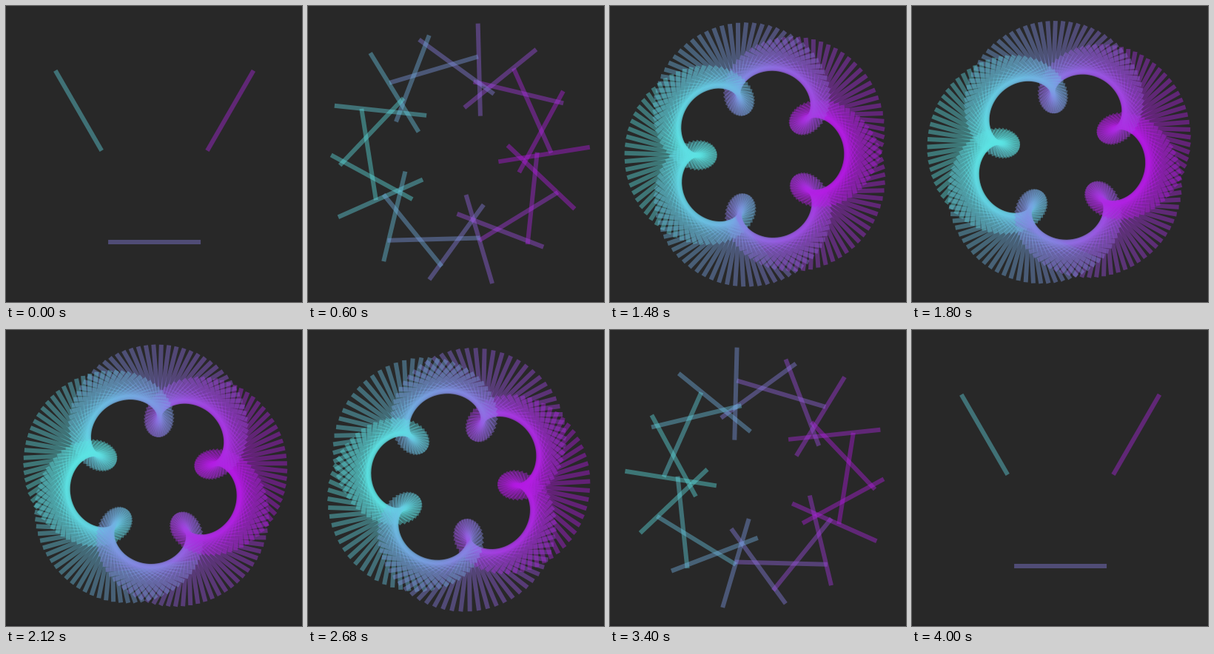
An HTML page that plays this animation: 400x400 px, repeating every 4.04 s.

```html
<!DOCTYPE html>
<html lang="en">
<head>
<meta charset="utf-8">
<title>Turning lines</title>
<style>
  html, body { margin: 0; width: 100%; height: 100%; overflow: hidden; background: #282828; }
  svg { display: block; width: 100vw; height: 100vh; }
</style>
</head>
<body>
<svg viewBox="0 0 400 400">
  <rect width="400" height="400" fill="#282828"/>
  <rect y="398" width="400" height="2" fill="#242325"/>
  <g id="lines" stroke-width="6" stroke-opacity="0.42"></g>
</svg>
<script>
  const STEP_MS = 40, STEPS = 101;
  const MIN_LINES = 3, BASE_LINES = 2.7, ADDED_LINES = 200;
  const CENTER = 200.6, RADIUS = 118.5, HALF_LENGTH = 62.5;
  const TURNS_PER_ORBIT = 3.5;
  const LEFT_COLOR = [92, 227, 227], RIGHT_COLOR = [180, 26, 227];
  const TAU = 2 * Math.PI;

  const group = document.getElementById('lines');
  const lines = Array.from({ length: Math.floor(BASE_LINES + ADDED_LINES) }, () =>
    group.appendChild(document.createElementNS('http://www.w3.org/2000/svg', 'line')));

  const easeCubicInOut = u => u < 0.5 ? 4 * u ** 3 : 1 - 4 * (1 - u) ** 3;
  const mix = (a, b, k) => a + (b - a) * k;

  function setLine(line, orbit, spin) {
    const x = CENTER - RADIUS * Math.sin(orbit);
    const y = CENTER + RADIUS * Math.cos(orbit);
    const dx = HALF_LENGTH * Math.cos(spin);
    const dy = HALF_LENGTH * Math.sin(spin);
    const side = (1 - Math.sin(orbit)) / 2;
    const color = LEFT_COLOR.map((c, i) => Math.round(mix(c, RIGHT_COLOR[i], side)));
    const attrs = { x1: x - dx, y1: y - dy, x2: x + dx, y2: y + dy, stroke: `rgb(${color})` };
    for (const name in attrs) line.setAttribute(name, attrs[name]);
  }

  function render(ms) {
    const t = Math.floor(ms / STEP_MS) % STEPS / (STEPS - 1);
    const growth = easeCubicInOut(1 - Math.abs(2 * t - 1));
    const count = Math.max(MIN_LINES, Math.floor(BASE_LINES + ADDED_LINES * growth));
    lines.forEach((line, j) => {
      const visible = j < count;
      line.style.display = visible ? '' : 'none';
      if (!visible) return;
      // Counter-clockwise, so each line overlaps its neighbour on the clockwise side.
      const orbit = -TAU * j / count;
      setLine(line, orbit, TURNS_PER_ORBIT * orbit - TAU * t);
    });
  }

  const start = performance.now();
  function tick() {
    render(performance.now() - start);
    requestAnimationFrame(tick);
  }
  tick();
</script>
</body>
</html>
```
